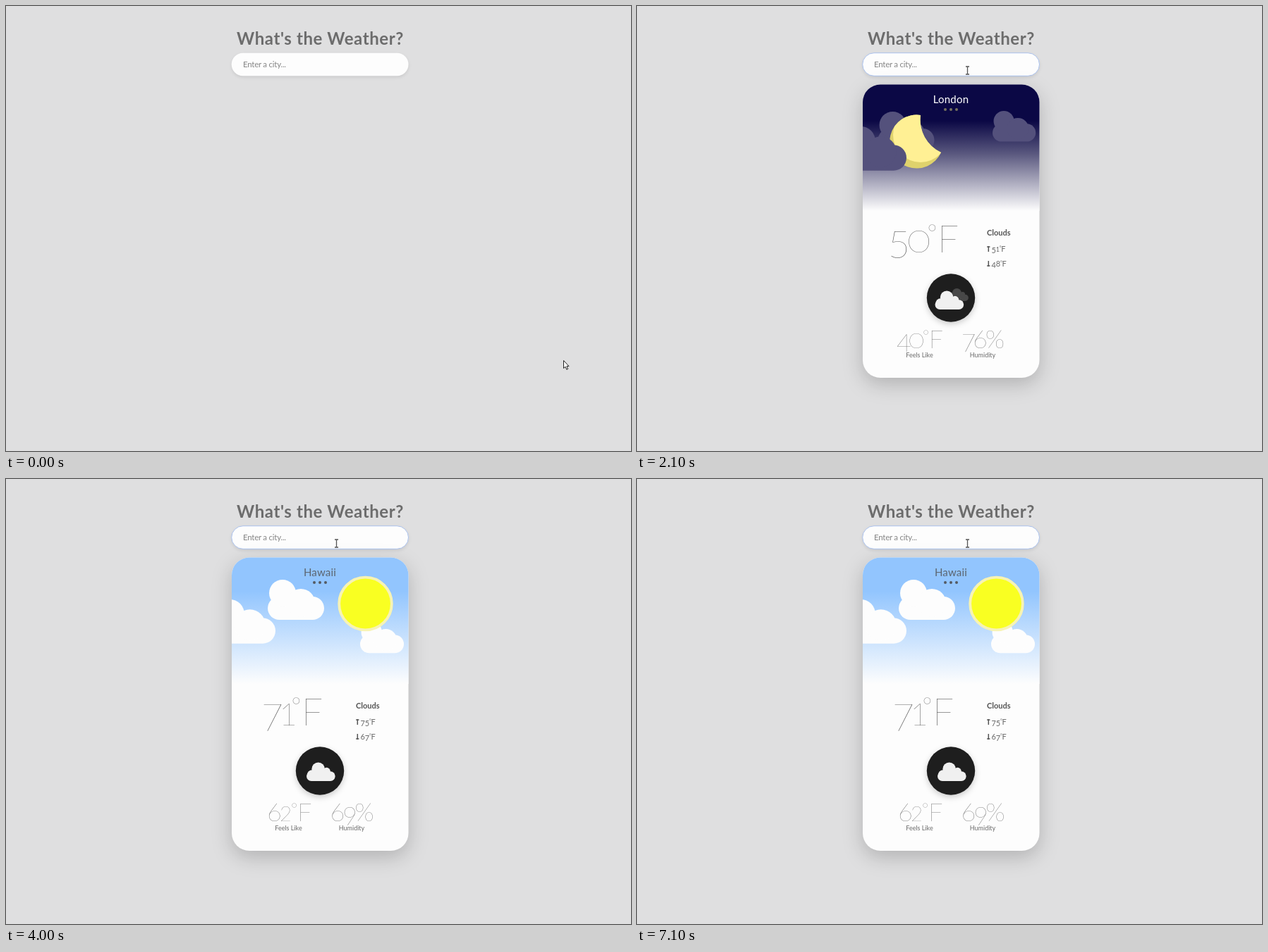
An HTML page that plays this animation: 886 px wide and 632 px high, repeating every 7200 ms.

```html
<!DOCTYPE html>
<html lang="en">
<head>
<meta charset="utf-8">
<title>What's the Weather?</title>
<style>
  html, body { margin: 0; width: 100%; height: 100%; overflow: hidden; background: #dfdfe0; }
  svg { display: block; width: 886px; height: 632px; font-family: Lato, "Open Sans", sans-serif; fill: #6a6a6a; }
  .mid { text-anchor: middle; }
  .thin { font-family: "Lato Hairline", Lato, sans-serif; font-weight: 100; text-anchor: middle; fill: #555; }
  .panel { filter: drop-shadow(0 9px 14px rgba(0, 0, 0, .2)); }
  .field { filter: drop-shadow(0 2px 2px rgba(0, 0, 0, .09)); }
  .badge { filter: drop-shadow(0 3px 4px rgba(0, 0, 0, .2)); }
</style>
</head>
<body>
<svg viewBox="0 0 886 632">
  <defs>
    <linearGradient id="night" x1="0" y1="0" x2="0" y2="1">
      <stop offset=".29" stop-color="#0b0845"/><stop offset=".55" stop-color="#5a587f"/>
      <stop offset="1" stop-color="#fdfdfd"/>
    </linearGradient>
    <linearGradient id="day" x1="0" y1="0" x2="0" y2="1">
      <stop offset=".27" stop-color="#92c5fe"/><stop offset="1" stop-color="#fdfdfd"/>
    </linearGradient>
    <clipPath id="card"><rect x="320" y="111.5" width="250.5" height="416.5" rx="25"/></clipPath>
    <clipPath id="crescent"><path d="M402 155A38 38 0 1 0 431 208A51 51 0 0 1 402 155"/></clipPath>
    <g id="cloud">
      <rect y="24" width="80" height="33" rx="16.5"/>
      <circle cx="21" cy="19" r="19"/><circle cx="47" cy="33" r="20"/>
    </g>
    <g id="puff">
      <rect y="13" width="41.5" height="14" rx="7"/>
      <circle cx="17" cy="9.5" r="9.5"/><circle cx="29" cy="13" r="5.5"/><circle cx="8" cy="18" r="7"/>
    </g>
  </defs>

  <text class="mid" x="445.5" y="54.5" font-size="24" font-weight="700" letter-spacing=".6" fill="#6c6c6c">What's the Weather?</text>
  <rect id="field" class="field" x="319.7" y="66.7" width="250.8" height="32.6" rx="16.3" fill="#fdfdfd"/>
  <text id="entry" x="336" y="87" font-size="11.5" letter-spacing="-.25"></text>
  <path id="caret" d="M0 77V89.500" stroke="#555" stroke-width="1"/>
  <g id="london"></g>
  <g id="hawaii"></g>
  <path id="arrow" d="M.5 .5V11.500L3 9.300L4.800 13.300L6.600 12.500L4.900 8.600H8Z" fill="#fff" stroke="#222"/>
  <path id="beam" d="M-2.500 -5.500H2.500M-2.500 5.500H2.500M0 -5.500V5.500" stroke="#555" stroke-width="1.300"/>
</svg>
<script>
const $ = id => document.getElementById(id);
const LOOP = 7200, FOCUS = 800;

// Old-style figures: 0-2 sit at x-height, 3 4 5 7 9 hang below the baseline.
function figures(text, size, y, centers) {
  return [...text].map((ch, i) => {
    let scale = 1, drop = 0;
    if ('012'.includes(ch)) scale = .82;
    if ('34579'.includes(ch)) drop = .14;
    if (ch === '°') { scale = .62; drop = -.29; }
    const glyph = ch === '0' ? (centers ? 'O' : 'o') : ch;
    const s = size * (glyph === 'o' ? 1.1 : scale);
    const x = centers ? ` x="${centers[i]}"` : '';
    return `<tspan${x} y="${y + drop * size}" font-size="${s}">${glyph}</tspan>`;
  }).join('');
}

const thin = (text, size, y, centers) =>
  `<text class="thin">${figures(text, size, y, centers)}</text>`;
const cloud = (x, y, k, fill) =>
  `<use href="#cloud" transform="translate(${x} ${y}) scale(${k})" fill="${fill}"/>`;
const puff = (x, y, k, fill) =>
  `<use href="#puff" transform="translate(${x} ${y}) scale(${k})" fill="${fill}"/>`;
const limit = (text, y, head) => `
  <path d="M498.300 ${y - 8}v8M496.200 ${head}h4.200" stroke="#555" stroke-width="1.500"/>
  <text x="502.500" font-size="11" letter-spacing="-.2">${figures(text, 11, y)}</text>`;

function card(c) {
  return `
  <rect class="panel" x="320" y="111.500" width="250.500" height="416.500" rx="25" fill="#fdfdfd"/>
  <g clip-path="url(#card)">
    <rect x="319" y="111" width="253" height="180" fill="url(#${c.sky})"/>${c.scene}
  </g>
  <text class="mid" x="445" y="138" font-size="15" letter-spacing=".2" fill="${c.ink}">${c.city}</text>
  ${[437, 445, 453].map(x => `<circle cx="${x}" cy="147" r="2" fill="${c.dots}"/>`).join('')}
  ${thin(c.temp, 54, 350, c.tempX)}
  <text x="496" y="325.500" font-size="11" font-weight="700" fill="#555">Clouds</text>
  ${limit(c.high, 349, 342)}${limit(c.low, 370, 369)}
  <circle class="badge" cx="445" cy="414.500" r="34.200" fill="#1e1e1e"/>${c.icon}
  ${thin(c.feels, 36, 486, c.feelsX)}${thin(c.humid, 36, 486, c.humidX)}
  <g class="mid" font-size="9"><text x="400.500" y="499">Feels Like</text><text x="490" y="499">Humidity</text></g>`;
}

const dusk = '#54517c';
$('london').innerHTML = card({
  city: 'London', sky: 'night', ink: '#fff', dots: '#77735f',
  scene: cloud(341.5, 150, 1, dusk) + cloud(504, 149, .765, dusk) +
    `<g clip-path="url(#crescent)"><rect x="355" y="150" width="80" height="85" fill="#dfd26c"/>
     <circle cx="402" cy="183" r="39" fill="#fff094"/></g>` + cloud(294, 171, 1.1, dusk),
  temp: '50°F', tempX: [371.5, 399.5, 418.5, 441],
  high: '51°F', low: '48°F',
  icon: puff(442, 401, .67, '#484848') + puff(422, 404, 1, '#1e1e1e') + puff(422.5, 404.5, .98, '#f0f0f0'),
  feels: '40°F', feelsX: [378.5, 396, 409.5, 424],
  humid: '76%', humidX: [470, 486.5, 507.5]
});
$('hawaii').innerHTML = card({
  city: 'Hawaii', sky: 'day', ink: '#5c6570', dots: '#545a62',
  scene: cloud(371, 143, 1, '#fdfdfd') + cloud(294, 171, 1.1, '#fdfdfd') + cloud(502, 203, .775, '#fdfdfd') +
    '<circle cx="509.500" cy="177" r="37.300" fill="#f9ff22" stroke="#f7f3b4" stroke-width="3.800"/>',
  temp: '71°F', tempX: [377.5, 400, 411.5, 434],
  high: '75°F', low: '67°F',
  icon: puff(426, 402.5, .98, '#f0f0f0'),
  feels: '62°F', feelsX: [380.5, 396.5, 408.5, 423.5],
  humid: '69%', humidX: [470, 487.5, 508]
});

const HINT = 'Enter a city...';
// [time, field content]
const typing = [
  [0, HINT], [1000, ''], [1100, 'L'], [1300, 'Lo'], [1400, 'Lon'], [1500, 'Lond'], [1600, 'London'],
  [1900, HINT], [2300, 'H'], [2500, 'Ha'], [2700, 'Haw'], [2900, 'Hawa'], [3000, 'Hawai'], [3100, 'Hawaii'],
  [3800, HINT]
];
// [time, caret shown]
const blink = [
  [0, 0], [800, 1], [2100, 0], [2300, 1], [3600, 0], [4200, 1], [4700, 0],
  [5200, 1], [5700, 0], [6300, 1], [6800, 0]
];
const at = (table, t) => table.filter(row => row[0] <= t).pop()[1];
const show = (id, on) => $(id).setAttribute('visibility', on ? 'visible' : 'hidden');
const move = (id, x, y) => $(id).setAttribute('transform', `translate(${x} ${y})`);

function draw(now) {
  const t = Math.floor(now % LOOP / 100) * 100;
  const text = at(typing, t), entry = $('entry');
  if (entry.textContent !== text) entry.textContent = text;
  entry.setAttribute('fill', text === HINT ? '#858585' : '#777');

  show('caret', at(blink, t));
  move('caret', text === HINT || !text ? 336.5 : 336.5 + entry.getComputedTextLength(), 0);
  $('field').setAttribute('stroke', t >= FOCUS ? '#a9c0ec' : 'none');

  const p = Math.min(t / FOCUS, 1), e = p * p * (3 - 2 * p);
  const x = 790 - 321.5 * e, y = 503 - 411.5 * e;
  const over = y < 99;
  show('arrow', !over);
  show('beam', over);
  move('arrow', x, y);
  move('beam', x, y);

  show('london', t >= 2100 && t < 4000);
  show('hawaii', t >= 4000);
}

function tick() {
  draw(performance.now());
  requestAnimationFrame(tick);
}
tick();
</script>
</body>
</html>
```
